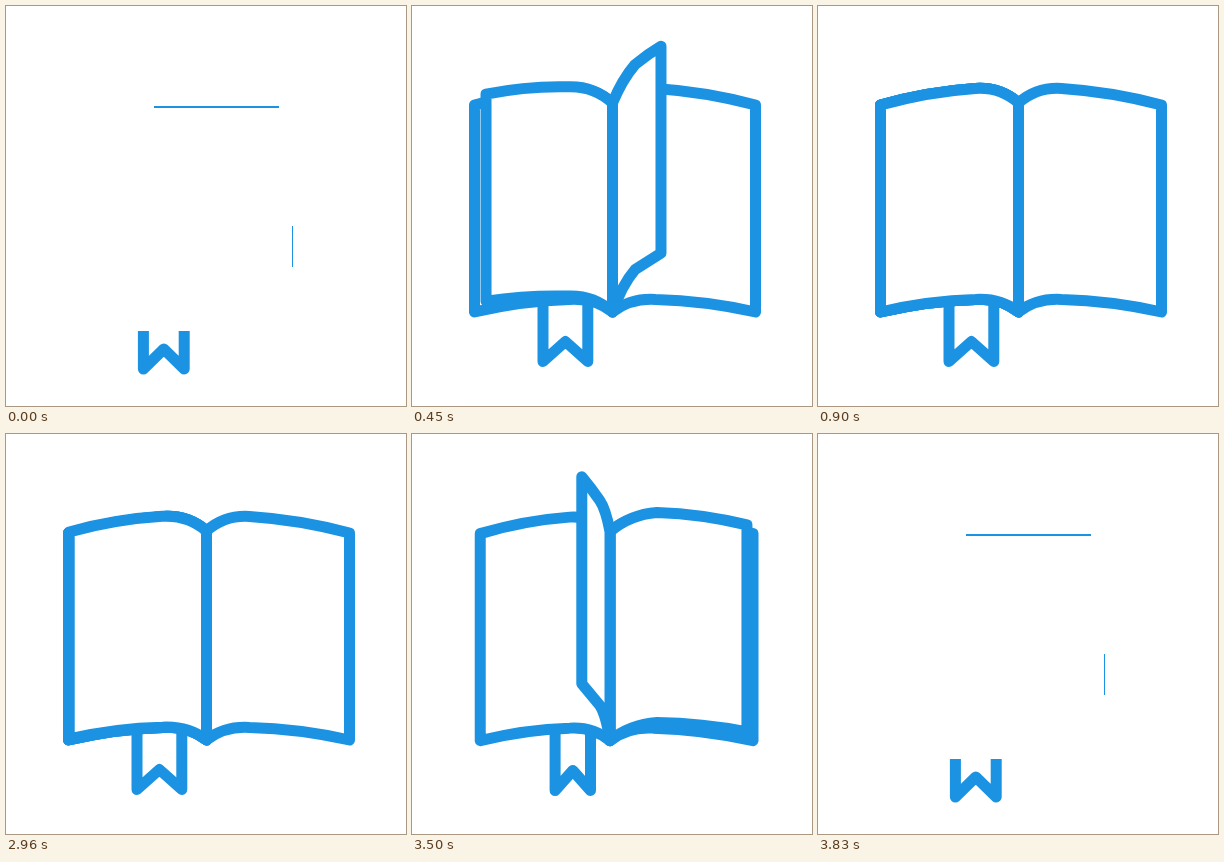
An HTML page with a canvas that plays this animation: 400 px wide and 400 px high, repeating every 4.86 s.

```html
<!DOCTYPE html>
<html lang="en">
<head>
<meta charset="utf-8">
<title>Book</title>
<style>
html, body { margin: 0; width: 100%; height: 100%; overflow: hidden; background: #fff; }
canvas { display: block; width: 100vmin; height: 100vmin; }
</style>
</head>
<body>
<canvas width="400" height="400"></canvas>
<script>
const ctx = document.querySelector('canvas').getContext('2d');
const BLUE = '#1b93e2', STROKE = 11;
const LOOP = 4860, STEP = 30, CLOSE_AT = 2960, LAST = 30;
const SPINE = 200.5, SPINE_TOP = 97, SPINE_BOTTOM = 306;

// Three sheets follow the cover at an even pace; all times in steps
const SHEETS = 3, FIRST_SHEET = 3.4, SHEET_GAP = 6.35, SHEET_TURN = 13.33;
const COVER_TURN = 11, SETTLED = 12;

const RIBBON = [
  { at: 0, middle: 157.8, half: 20.4, foot: 363 },
  { at: 11, middle: 160.8, half: 17.7, foot: 356.5 },
  { at: 13, middle: 153.4, half: 22.4, foot: 355.5 }
];

const clamp = v => Math.min(1, Math.max(0, v));
const mix = (a, b, f) => a + (b - a) * f;

// turn runs from 0 (flat on the right) to 1 (flat on the left)
function drawSheet({ turn, squeeze = 1 }) {
  const c = Math.cos(Math.PI * turn), s = Math.sin(Math.PI * turn);
  const lift = (61.5 + 10 * c) * Math.max(0, s) ** 1.7;
  const x = v => SPINE + (v - SPINE) * squeeze;

  const edgeX = 203 + 140.5 * c, edgeY = 99 - lift;
  const bend = 43 * c + 18 * s * c + 3 * s;
  const bendX = SPINE + bend, bendY = 82.5 - lift * (0.34 + 0.2 * c);
  const rootX = SPINE + 0.42 * bend, rootY = 81 - 0.12 * lift;
  const bowX = (edgeX + bendX) / 2, bowY = (edgeY + bendY) / 2;
  const flat = c ** 4;
  const fall = 205 + 6 * flat;

  ctx.beginPath();
  ctx.moveTo(x(edgeX), edgeY);
  ctx.quadraticCurveTo(x(bowX), bowY - 5 * Math.abs(c), x(bendX), bendY);
  ctx.quadraticCurveTo(x(rootX), rootY, SPINE, SPINE_TOP);
  ctx.lineTo(SPINE, SPINE_BOTTOM);
  ctx.quadraticCurveTo(x(rootX), rootY + fall, x(bendX), bendY + fall);
  ctx.quadraticCurveTo(x(bowX), bowY + (fall + 207) / 2 - 5 * flat, x(edgeX), edgeY + 207);
  ctx.closePath();
  ctx.fill();
  ctx.stroke();
}

function drawRibbon(step, top) {
  const next = Math.max(1, RIBBON.findIndex(key => key.at >= Math.min(step, 13)));
  const a = RIBBON[next - 1], b = RIBBON[next];
  const f = clamp((step - a.at) / (b.at - a.at));
  const middle = mix(a.middle, b.middle, f);
  const half = mix(a.half, b.half, f);
  const foot = mix(a.foot, b.foot, f);

  ctx.lineWidth = STROKE;
  ctx.beginPath();
  ctx.moveTo(middle - half, top);
  ctx.lineTo(middle - half, foot);
  ctx.lineTo(middle, foot - 20);
  ctx.lineTo(middle + half, foot);
  ctx.lineTo(middle + half, top);
  ctx.stroke();
}

function drawClosed() {
  ctx.fillStyle = BLUE;
  ctx.fillRect(148, 100, 125, 2);
  ctx.fillRect(286, 220, 1, 41);
}

function drawBook(step) {
  const away = Math.max(0, 1 - step / SETTLED) ** 1.3;
  const stack = [{ turn: clamp(step / COVER_TURN), squeeze: 1 - 0.3 * Math.sqrt(away) }];
  for (let i = 0; i < SHEETS; i++) {
    const start = FIRST_SHEET + i * SHEET_GAP;
    if (step > start) stack.push({ turn: clamp((step - start) / SHEET_TURN) });
  }
  const onRight = sheet => sheet.turn < 0.5;

  ctx.save();
  ctx.translate(-63 * away, 16 * away);
  ctx.lineWidth = Math.min(STROKE, 1 + step * 2);
  ctx.fillStyle = '#fff';
  drawSheet({ turn: 0 });
  stack.filter(onRight).reverse().forEach(drawSheet);
  stack.filter(sheet => !onRight(sheet)).forEach(drawSheet);
  ctx.restore();
}

function stepAt(time) {
  if (time < CLOSE_AT) return Math.min(LAST, Math.floor(time / STEP));
  return Math.max(0, LAST - 1 - Math.floor((time - CLOSE_AT) / STEP));
}

const began = performance.now();

function render() {
  const step = stepAt((performance.now() - began) % LOOP);
  ctx.clearRect(0, 0, 400, 400);
  ctx.strokeStyle = BLUE;
  ctx.lineJoin = 'round';
  if (step === 0) {
    drawRibbon(step, 325);
    drawClosed();
  } else {
    drawRibbon(step, 297);
    drawBook(step);
  }
  requestAnimationFrame(render);
}
render();
</script>
</body>
</html>
```
